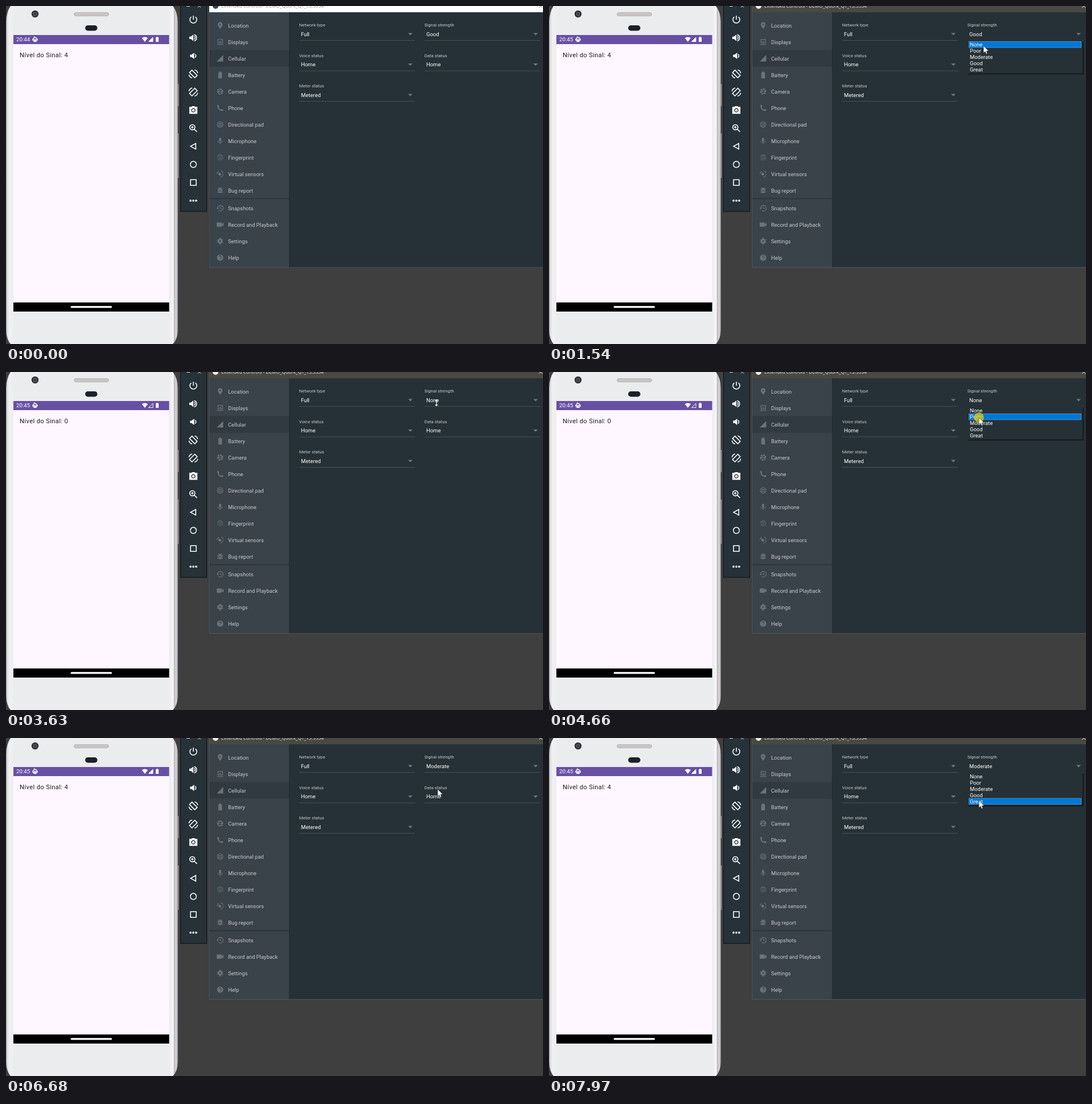
These frames come from a looping animation (943x594 px, 8000 ms). An HTML page:

```html
<!DOCTYPE html>
<html lang="en">
<head>
<meta charset="utf-8">
<title>Signal level demo</title>
<style>
html, body { margin: 0; width: 100%; height: 100%; overflow: hidden; background: #3f3f3f; }
svg { display: block; font-family: Roboto, sans-serif; }
.line { fill: none; stroke-linecap: butt; }
.value { font-size: 9.45px; fill: #fff; }
.label { font-size: 7.8px; fill: #c3c9cc; }
.menu { font-size: 9.4px; fill: #c6cacd; }
</style>
</head>
<body>
<svg id="stage" width="943" height="594" viewBox="0 0 943 594">
  <defs>
    <linearGradient id="shell">
      <stop offset="0" stop-color="#8f8c90"/><stop offset=".006" stop-color="#dcdcdf"/>
      <stop offset=".02" stop-color="#f1f1f3"/><stop offset=".05" stop-color="#ebecee"/>
      <stop offset=".95" stop-color="#ebecee"/><stop offset=".972" stop-color="#f6f6f7"/>
      <stop offset=".98" stop-color="#b9b5ba"/><stop offset=".99" stop-color="#dedde0"/>
      <stop offset="1" stop-color="#858287"/>
    </linearGradient>
  </defs>
  <rect width="943" height="594" fill="#3f3f3f"/>

  <g id="phone">
    <path d="M299 137h4v39h-4zM299 224h4v78h-4z" fill="#b5b0b6"/>
    <path d="M8 0Q1 10 0 28V570Q1 586 8 594H293Q301 586 302 570V28Q301 10 293 0Z" fill="url(#shell)"/>
    <circle cx="51" cy="14" r="6.2" fill="#34343a"/>
    <circle cx="51" cy="14" r="3.2" fill="#5b5b62"/>
    <circle cx="51" cy="14" r="1.6" fill="#222"/>
    <rect x="119.500" y="11.500" width="61" height="6" rx="3" fill="#c9c5c7" stroke="#aaa6a8" stroke-width=".7"/>
    <rect x="139" y="34" width="21.500" height="9.500" rx="4.700" fill="#1c2028"/>
    <rect x="13" y="51" width="273.500" height="470" fill="#fef7ff"/>
    <rect x="13" y="51" width="273.500" height="16" fill="#6750a4"/>
    <rect x="13" y="521" width="273.500" height="16" fill="#000"/>
    <rect x="113.500" y="527.300" width="72.500" height="3.200" rx="1.600" fill="#fff"/>
    <text id="clock" x="18" y="62.300" font-size="9.700" fill="#fff"></text>
    <g fill="#fff">
      <circle cx="51" cy="59" r="3.600" fill="none" stroke="#fff" stroke-width="1.500"/>
      <path d="M46 58.500h10v1.200H46zM49 53l4 3h-4zM49.500 59h3v4h-3z"/>
      <path d="M238.700 56.300Q243.800 52.500 249 56.300L243.800 63Z"/>
      <path d="M250.500 62.500H258V55Z" fill="none" stroke="#fff" stroke-width=".9"/>
      <path id="bars"/>
      <path d="M263 55h1.500v-1h2v1h1.500v8h-5z"/>
    </g>
    <text id="level" x="24" y="89.700" font-size="11.200" letter-spacing=".35" fill="#1d1b20"></text>
  </g>

  <g id="toolbar">
    <rect x="306.500" y="-2" width="46" height="363" fill="#263238" stroke="#0c0f11"/>
    <path class="line" d="M317 .5h6M337 -2.500l5 5m0-5l-5 5" stroke="#e5e8e9"/>
  </g>

  <g id="window">
    <rect x="355.500" y="-2" width="590" height="462" fill="#263137"/>
    <rect id="titleBar" x="357" y="-1" width="586" height="12"/>
    <g id="titleInk">
      <circle id="appMark" cx="368" cy="0" r="5"/>
      <text x="378" y="3.300" font-family="Open Sans, sans-serif" font-size="8.300">Extended Controls - DEMO_Quork_QT_13:5554</text>
      <path class="line" d="M936 -3l6 6m0-6l-6 6" stroke="currentColor"/>
    </g>
    <rect x="357" y="11" width="140" height="448" fill="#3a434a"/>
    <rect x="357" y="77.500" width="140" height="29" fill="#313a41"/>
    <path class="line" d="M357 338.500H497" stroke="#293238" stroke-width="1.500"/>
    <path class="line" d="M497.500 11V459" stroke="#20292e"/>
    <path id="border" class="line" d="M356.500 0V459.500H943"/>
  </g>

  <g id="dropdown">
    <rect x="736" y="62" width="203" height="58.500" fill="#11181c" opacity=".65"/>
    <rect x="734.500" y="59" width="202.500" height="59.500" fill="#263137"/>
    <path class="line" d="M738 119H937.500V65" stroke="#141b1f" stroke-width="1.200"/>
    <rect id="pick" x="737.500" width="197" height="10.500" fill="#0078d7" stroke="#55a0d8" stroke-width=".8"/>
  </g>
  <circle id="halo" r="8.700" fill="#d2cd14" opacity=".78"/>
  <path id="arrow" d="M0 0V12.500L2.900 9.900L4.800 14.300L6.900 13.400L5 9.100H9Z" fill="#fff" stroke="#222" stroke-width=".6"/>
  <path id="resize" class="line" d="M0-5V5M-2.200-3.200L0-5.500L2.200-3.200M-2.200 3.200L0 5.500L2.200 3.200" stroke="#fff" stroke-width="1.200"/>
</svg>
<script>
const $ = id => document.getElementById(id);
const add = (id, markup) => $(id).insertAdjacentHTML('beforeend', markup);
const disc = 'M12 2a10 10 0 1 0 .01 0z';

// Icons live on a 24-unit grid: outline, solid part, then strokes cut out of it.
function icon(id, x, y, size, color, [outline = '', solid = '', cut = ''], back) {
  add(id, `<g transform="translate(${x} ${y}) scale(${size / 24}) translate(-12 -12)">
    <path d="${solid}" fill="${color}"/>
    <path class="line" d="${outline}" stroke="${color}" stroke-width="2.2"/>
    <path class="line" d="${cut}" stroke="${back}" stroke-width="2"/></g>`);
}

const tools = [
  ['M12 2v10M7 5.200a8.500 8.500 0 1 0 10 0'],
  ['M14 8a4.500 4.500 0 0 1 0 8M14 4a8.300 8.300 0 0 1 0 16', 'M2 9v6h4l6 5V4L6 9z'],
  ['M16 8a4.500 4.500 0 0 1 0 8', 'M4 9v6h4l6 5V4L8 9z'],
  ['M8.500 2.500l13 13-6 6-13-13zM15 2q6 1 8 8M9 22q-6-1-8-8'],
  ['M15.500 2.500l-13 13 6 6 13-13zM9 2q-6 1-8 8M15 22q6-1 8-8'],
  ['', 'M9 2L7 4H2v17h20V4h-5l-2-2z', 'M12 8a4.300 4.300 0 1 0 .01 0z'],
  ['M9.500 3a6.500 6.500 0 1 0 .01 0zM14 14l7 7M9.500 6.500v6M6.500 9.500h6'],
  ['M18 5v14L5 12z'],
  ['M12 4.500a7.500 7.500 0 1 0 .01 0z'],
  ['M5 5h14v14H5z'],
  ['', [5, 12, 19].map(x => `M${x} 9.500a2.500 2.500 0 1 0 .01 0z`).join('')]
];
tools.forEach((shape, i) => icon('toolbar', 329, 24 + 31.8 * i, 17, '#fff', shape, '#263238'));

const menu = {
  'Location': ['', 'M12 1a7.500 7.500 0 0 0-7.500 8c0 5 7.500 14 7.500 14s7.500-9 7.500-14A7.500 7.500 0 0 0 12 1z', 'M12 7.500a1.500 1.500 0 1 0 .01 0z'],
  'Displays': ['M5 4h15v11H5zM2 20h20M9 11h7'],
  'Cellular': ['', 'M1 22h21V1z'],
  'Battery': ['', 'M6 4h3V1h6v3h3v19H6z'],
  'Camera': ['', disc, 'M9 2l6 10M20 5l-8 6M22 15H11M15 22l-6-10M4 19l8-6M2 9h11'],
  'Phone': ['', 'M7 10.500Q9.500 15 14 17.500l2-2.300 6 1.800v4.500Q4 24 2.500 2.500H7l2 6z'],
  'Directional pad': ['', disc, 'M12 6v12M6 12h12M12 5a7 7 0 1 0 .01 0z'],
  'Microphone': ['M5 11a7 7 0 0 0 14 0M12 18v4', 'M8.500 5a3.500 3.500 0 0 1 7 0v6a3.500 3.500 0 0 1-7 0z'],
  'Fingerprint': ['M4 7q8-8 16 0M3 13q0-7 9-7t9 7v4M6 20q-1-10 6-10t6 10M10 22q-1-8 2-8t2 8'],
  'Virtual sensors': ['M2 12a10 10 0 0 1 6-8M22 12a10 10 0 0 1-9 10M15 2a10 10 0 0 1 7 7', 'M11 8a4.500 4.500 0 1 0 .01 0z'],
  'Bug report': ['M3 8h18M3 13h18M3 18h18M7 2l3 4M17 2l-3 4', 'M7 9a5 5 0 0 1 10 0v7a5 5 0 0 1-10 0z', 'M10 11h4M10 15h4'],
  'Snapshots': ['M4 12a9 9 0 1 1 3 7M13 7v6l4 2', 'M0 11h8l-4 5z'],
  'Record and Playback': ['', 'M1 5h16v5l6-4v12l-6-4v5H1z'],
  'Settings': ['M10 1v22M14 1v22M2 8l20 9M2 16l20-9', 'M12 4a8 8 0 1 0 .01 0z', 'M12 10a2 2 0 1 0 .01 0z'],
  'Help': ['', disc, 'M8.500 9.500a3.500 3.500 0 1 1 5 3Q12 13.500 12 15M12 17v2']
};
Object.entries(menu).forEach(([name, shape], i) => {
  const y = 34.2 + 29 * i + (i > 10 ? 2 : 0);
  icon('window', 376, y, 13, name === 'Fingerprint' ? '#555f66' : '#6b747a', shape, '#3a434a');
  add('window', `<text class="menu" x="390" y="${y + 3.5}">${name}</text>`);
});

const fields = [['Network type', 'Full'], ['Signal strength', 'Good'], ['Voice status', 'Home'], ['Data status', 'Home'], ['Meter status', 'Metered']];
fields.forEach(([label, value], i) => {
  const x = 515 + 220 * (i % 2), y = 53.5 * (i >> 1);
  add('window', `<text class="label" x="${x - .3}" y="${y + 36.300}">${label}</text>
    <text class="value" x="${x + 3}" y="${y + 52.800}" ${i === 1 ? 'id="signal"' : ''}>${value}</text>
    <path d="M${x + 191} ${y + 47.500}h8l-4 4z" fill="#6f797e"/>
    <path class="line" d="M${x} ${y + 60.500}h203" stroke="#445056"/>`);
});

const options = ['None', 'Poor', 'Moderate', 'Good', 'Great'];
const rowTop = 62.5, rowHeight = 10.9;
options.forEach((name, i) => add('dropdown', `<text class="value" x="739" y="${71 + rowHeight * i}">${name}</text>`));

// Pointer waypoints: time, x, y
const path = [
  [240, 912, 594], [560, 800, 130], [740, 766, 31], [930, 761, 57], [1200, 761, 57],
  [1810, 764, 79], [2150, 764, 79], [2210, 763, 72], [2960, 763, 72], [3400, 753, 47],
  [3700, 757, 55], [3920, 757, 55], [4460, 755, 80], [4860, 755, 80], [5400, 762, 53],
  [5600, 762, 53], [5880, 767, 78], [6270, 765, 89], [6500, 765, 89], [6680, 758, 90],
  [7100, 760, 45], [7300, 760, 45], [7970, 755, 110]
];
const clicks = [1070, 2410, 3790, 4660, 5470, 6340, 7170];
const openings = [[1200, 2480], [3920, 4790], [5600, 6470], [7300, 8000]];
// Time, selected option, reported level
const states = [[0, 3, 4], [2480, 0, 4], [2550, 0, 0], [4790, 1, 0], [4860, 1, 2], [6470, 2, 2], [6540, 2, 4]];

function pointerAt(t) {
  const next = path.findIndex(p => p[0] > t);
  if (next < 0) return path.at(-1).slice(1);
  const [t0, x0, y0] = path[next - 1], [t1, x1, y1] = path[next];
  const u = (t - t0) / (t1 - t0), k = u * u * (3 - 2 * u);
  return [x0 + (x1 - x0) * k, y0 + (y1 - y0) * k];
}

const show = (id, on) => $(id).setAttribute('display', on ? 'inline' : 'none');
const set = (id, attribute, value) => $(id).setAttribute(attribute, value);

function draw(t) {
  const visible = t >= 240, active = t >= 1070;
  const [x, y] = visible ? pointerAt(t) : [0, 0];
  const open = openings.some(([from, to]) => t >= from && t < to);
  const [, selected, level] = states.findLast(s => t >= s[0]);

  $('clock').textContent = t < 1500 ? '20:44' : '20:45';
  $('level').textContent = 'Nível do Sinal: ' + level;
  $('signal').textContent = options[selected];
  const w = 7.5 * level / 4;
  set('bars', 'd', `M250.500 62.500h${w}v${-w}z`);

  set('titleBar', 'fill', active ? '#4a4842' : '#fff');
  set('titleInk', 'fill', active ? '#e4e4e0' : '#999');
  set('titleInk', 'color', active ? '#e4e4e0' : '#999');
  set('appMark', 'fill', active ? '#eee' : '#345');
  set('border', 'stroke', active ? '#57564f' : '#4c5153');

  show('dropdown', open);
  const row = y < rowTop ? selected : Math.min(4, Math.floor((y - rowTop) / rowHeight));
  set('pick', 'y', rowTop + rowHeight * row);

  const resizing = !open && y > 51 && y < 62;
  const place = `translate(${Math.round(x)} ${Math.round(y)})`;
  for (const id of ['halo', 'arrow', 'resize']) set(id, 'transform', place);
  show('halo', clicks.some(c => t >= c && t < c + 140));
  show('arrow', visible && !resizing);
  show('resize', visible && resizing);
}

const start = performance.now();
function tick() {
  draw((performance.now() - start) % 8000);
  requestAnimationFrame(tick);
}
tick();
</script>
</body>
</html>
```
